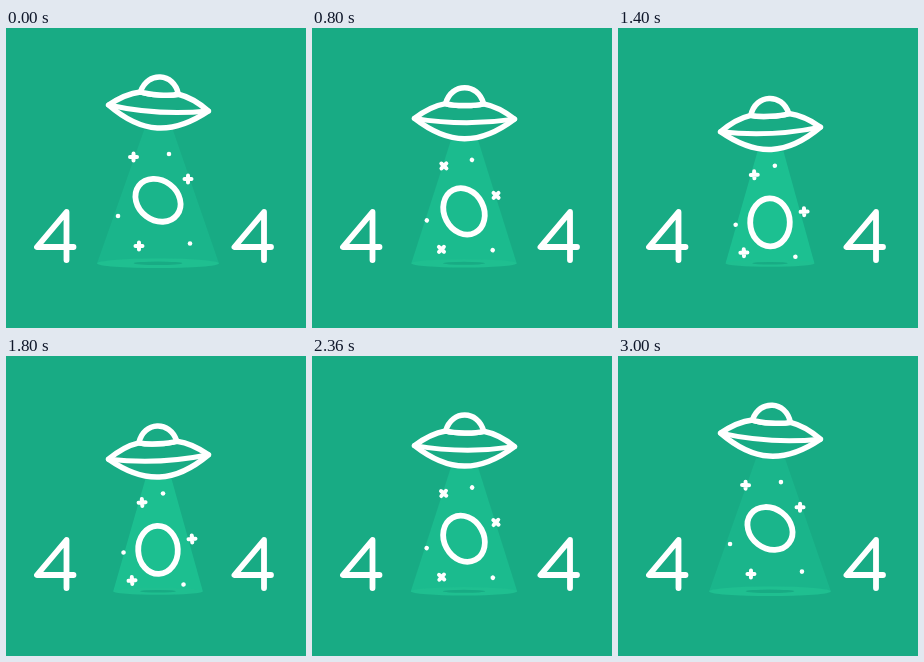
Write an HTML page that moves like this. It is 300 px wide and 300 px high and loops after 3.04 s.

```html
<!DOCTYPE html>
<html lang="en">
<head>
<meta charset="utf-8">
<title>404</title>
<style>
html, body { margin: 0; width: 100%; height: 100%; overflow: hidden; background: #18ab84; }
svg { display: block; width: 100vw; height: 100vh; }
.line { fill: none; stroke: #fff; stroke-width: 5.8; stroke-linecap: round; stroke-linejoin: round; }
.hull { fill: #18ab84; stroke-width: 5.5; }
.cross { stroke-width: 4; }
</style>
</head>
<body>
<svg viewBox="0 0 300 300">
  <path id="beam" fill="#1fcb98"/>
  <ellipse id="pool" cx="152" cy="235.3" fill="#1fbf90"/>
  <ellipse id="shade" cx="152" cy="235.3" fill="#18ab84"/>
  <path class="line" d="M60.5 232V184L31 219H67.5M258 232V184L228.5 219H265"/>
  <ellipse id="zero" class="line" rx="19.8" ry="24"/>
  <g id="stars"></g>
  <g id="ufo">
    <path class="line hull" d="M-50 0C-41 -7 -30 -13 -19 -15C-10 -12.5 10 -12.5 19 -15C30 -13 41 -7 50 0C33 13 16 20 0 20S-33 13 -50 0Z"/>
    <path class="line hull" d="M-19 -15C-16 -26 -8 -31 0 -31S16 -26 19 -15C10 -12.5 -10 -12.5 -19 -15Z"/>
    <path class="line" style="stroke-width:5" d="M-50 0Q0 8 50 0"/>
  </g>
</svg>
<script>
const HALF = 1520, START = 50;
const $ = id => document.getElementById(id);
const mix = (a, b, p) => a + (b - a) * p;
const ease = x => x < .5 ? 2 * x * x : 1 - 2 * (1 - x) ** 2;

function set(el, attrs) {
  for (const name in attrs) el.setAttribute(name, attrs[name]);
}

// x, y, travel x, travel y, is cross
const stars = [
  [127.5, 129, 9, 18.3, true],
  [182, 151, 4.2, 33.5, true],
  [133, 218, -7.3, 6.8, true],
  [163, 126, -6.3, 12],
  [112, 188, 5.8, 8.9],
  [184, 215.5, -6.8, 13.6]
].map(([x, y, dx, dy, cross]) => {
  const el = document.createElementNS("http://www.w3.org/2000/svg", cross ? "path" : "circle");
  set(el, cross ? { class: "line cross", d: "M-3.5 0H3.5M0 -3.5V3.5" } : { r: 2.3, fill: "#fff" });
  $("stars").append(el);
  return { el, x, y, dx, dy };
});

function draw(time) {
  const phase = ((time - START) / HALF % 2 + 2) % 2;
  const p = ease(phase < 1 ? phase : 2 - phase);
  const ufoY = mix(80, 102, p), wide = mix(61, 44, p), top = mix(14.5, 13, p);

  set($("ufo"), { transform: `translate(152.5 ${ufoY}) rotate(${mix(3.5, -2.8, p)})` });
  set($("zero"), { transform: `translate(152 ${mix(172.3, 195, p)}) rotate(${mix(-53, 0, p)})` });
  set($("beam"), {
    d: `M${152.5 - top} ${ufoY + 22}H${152.5 + top}L${152 + wide} 235.3H${152 - wide}Z`,
    opacity: mix(.32, .68, p)
  });
  set($("pool"), { rx: wide, ry: mix(4.8, 3.5, p) });
  set($("shade"), { rx: wide * .4, ry: mix(1.8, 1.3, p) });
  for (const s of stars)
    set(s.el, { transform: `translate(${s.x + s.dx * p} ${s.y + s.dy * p}) rotate(${90 * p})` });
}

function tick() {
  draw(performance.now());
  requestAnimationFrame(tick);
}
tick();
</script>
</body>
</html>
```
